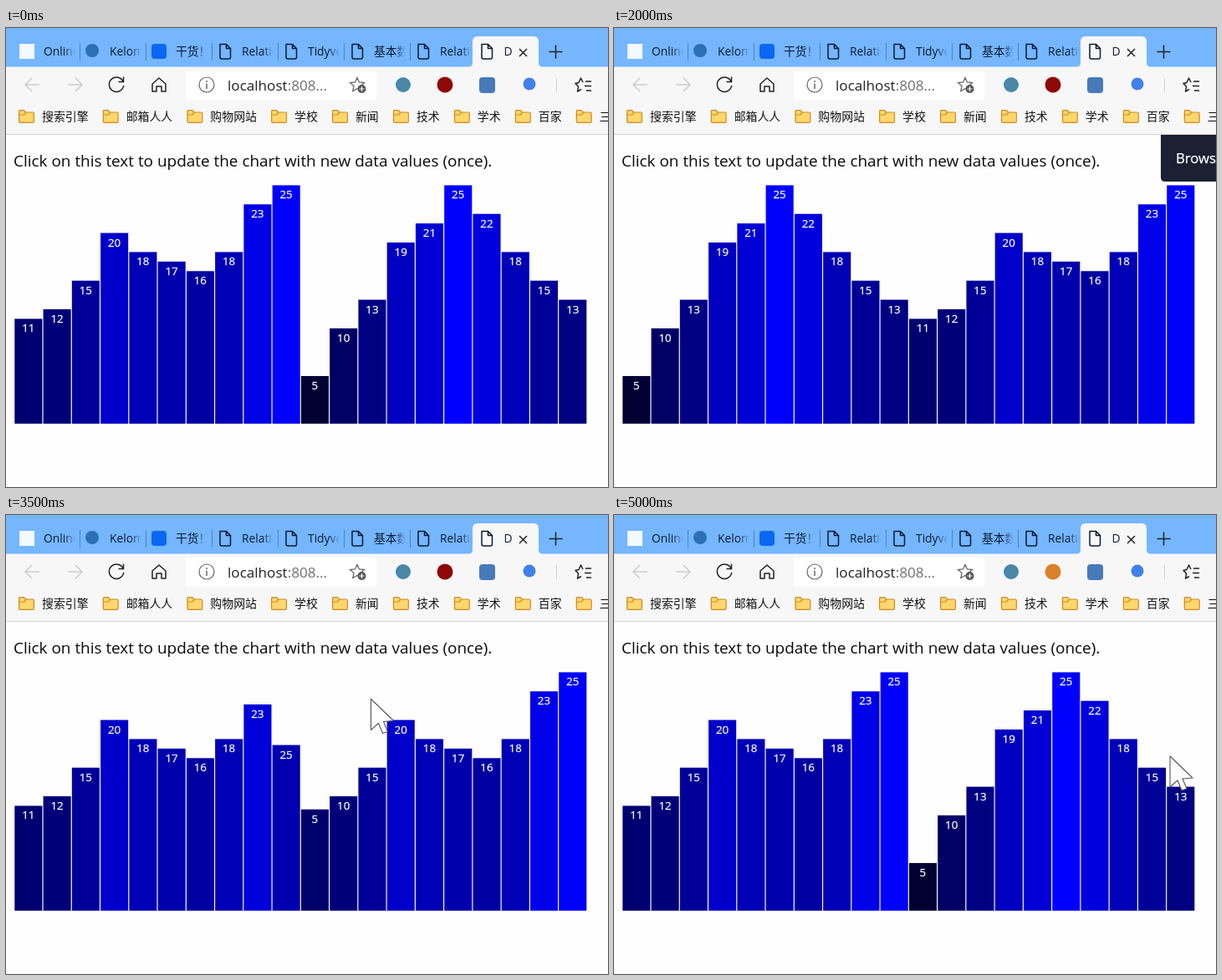
Write an HTML page that moves like this. It is 720 px wide and 550 px high and loops after 5.5 s.

```html
<!DOCTYPE html>
<html lang="en">
<head>
<meta charset="utf-8">
<title>Bar chart in a browser</title>
<style>
  html, body { margin: 0; width: 100%; height: 100%; overflow: hidden; background: #fefefe; }
  svg { display: block; width: 720px; height: 550px; font-family: "Open Sans", "Noto Sans CJK SC", "Noto Sans CJK", sans-serif; }
  .line { fill: none; stroke: #222; stroke-width: 1.5; }
  .dim { stroke: #cdcdcd; }
  .tab { font-size: 13.8px; fill: #0c1a30; }
  .mark { font-size: 13.9px; fill: #111; }
  .label { font-size: 13.3px; fill: #fff; stroke: #fff; stroke-width: .25; text-anchor: middle; }
</style>
</head>
<body>
<svg viewBox="0 0 720 550">
  <defs>
    <linearGradient id="fade" x1="0" x2="1" y1="0" y2="0">
      <stop offset=".65" stop-color="#fff"/>
      <stop offset="1" stop-color="#fff" stop-opacity="0"/>
    </linearGradient>
    <mask id="clip" maskUnits="userSpaceOnUse" x="0" y="0" width="38" height="47">
      <rect width="38" height="47" fill="url(#fade)"/>
    </mask>
    <path id="page" d="M-6-8.5H1.5L6.5-3.5V7Q6.5 9 4.5 9H-4Q-6 9-6 7ZM1.5-8.5V-3.5H6.5" fill="none" stroke="#0c1a30" stroke-width="1.5" stroke-linejoin="round"/>
    <g id="folder" stroke="#cf8a1f" stroke-width="1.2" stroke-linejoin="round">
      <path d="M.6 14V1.6Q.6.6 1.6.6H6.5L8.7 3H17Q18.4 3 18.4 4.4V14Q18.4 15.4 17 15.4H2Q.6 15.4.6 14Z" fill="#ffd76e"/>
      <path d="M.6 6H6.5L9 3.2" fill="none"/>
    </g>
    <path id="star" d="M0-8.5L2.5-3L8.5-2.4L4 1.6L5.2 7.5L0 4.5L-5.2 7.5L-4 1.6L-8.5-2.4L-2.5-3Z"/>
  </defs>

  <rect width="720" height="550" fill="#fefefe"/>
  <rect width="720" height="48" fill="#75b6ff"/>
  <rect y="46.500" width="720" height="81" fill="#f7f7f7"/>
  <rect y="127" width="720" height="1" fill="#d2d2d2"/>
  <path d="M552 47Q558 47 558 41V16Q558 10 564 10H631Q637 10 637 16V41Q637 47 643 47Z" fill="#f7f7f7"/>
  <g id="tabs"></g>

  <rect x="16" y="19" width="18" height="18" fill="#f4f8ff"/>
  <circle cx="103" cy="27" r="8" fill="#2d70b2"/>
  <rect x="174" y="19" width="18" height="18" rx="4" fill="#0c66f2"/>
  <use id="tabPage" href="#page" x="575" y="28"/>
  <g id="loader" fill="#1769d2"><circle cx="569" cy="25" r="1.9"/><circle cx="569" cy="31" r="1.9"/></g>
  <path class="line" d="M614 25L623 34M623 25L614 34M649.500 28.500H665.500M657.500 20.500V36.500"/>

  <path class="line dim" d="M40 68H23M31 60L23 68L31 76M74 68H91M83 60L91 68L83 76"/>
  <rect id="hover" x="110" y="51" width="45" height="35" rx="3" fill="#dcdcdc"/>
  <path id="reload" class="line" d="M140.200 64.500A8.700 8.700 0 1 0 140.700 69M140.500 58.500V64.500H134.500"/>
  <path id="stop" class="line" d="M125.500 61.500L139.500 75.500M139.500 61.500L125.500 75.500"/>
  <path class="line" d="M175 67L183 60L191 67V76H186V70H180V76H175Z" stroke-linejoin="round"/>
  <rect x="215" y="51" width="228" height="35" rx="4" fill="#fff"/>
  <circle class="line" cx="240" cy="68" r="9" style="stroke:#666;stroke-width:1.2"/>
  <path class="line" d="M240 66.500V73M240 63V65" style="stroke:#666"/>
  <text x="265" y="75" font-size="17.1" fill="#222">localhost<tspan fill="#707070">:808...</tspan></text>
  <use href="#star" x="420" y="68" class="line" style="stroke:#666;stroke-width:1.3"/>
  <circle cx="425.500" cy="73" r="5" fill="#555"/>
  <path d="M422.500 73H428.500M425.500 70V76" stroke="#fff" stroke-width="1.2"/>

  <circle cx="475" cy="68" r="9" fill="#4a86a8"/>
  <circle id="blocker" cx="525" cy="68" r="9.500"/>
  <rect x="566" y="59" width="19" height="19" rx="4" fill="#477ab8"/>
  <circle cx="626" cy="67" r="7.500" fill="#4280e8"/>
  <path d="M658.500 60V77" stroke="#d0d0d0"/>
  <path class="line" d="M693 64H700M692 69.500H700M694 75H700M690 65L687.500 60L685 65.500L681 66.500L684.500 70L683.500 76L688 73.500" stroke-linejoin="round"/>
  <g id="marks"></g>

  <text x="9" y="165.500" font-size="18.95" fill="#0a0a0a">Click on this text to update the chart with new data values (once).</text>
  <g id="chart"></g>
  <g id="notice">
    <path d="M654 128H720V184H659Q654 184 654 179Z" fill="#1b2032"/>
    <text x="672" y="162" font-size="16.7" fill="#fff" stroke="#fff" stroke-width=".25">Browsersync: connected</text>
  </g>
  <path id="cursor" d="M0 0V37L9 29L14 41L20 39L15 27L27 26Z" fill="#fff" stroke="#555" stroke-width="1.1" stroke-linejoin="round"/>
</svg>
<script>
const LOOP = 5500, STEP = 500;
const RELOAD = 1500, CLICK = 2375, STAGGER = 100, DURATION = 500;
const before = [5, 10, 13, 19, 21, 25, 22, 18, 15, 13, 11, 12, 15, 20, 18, 17, 16, 18, 23, 25];
const after = [...before.slice(10), ...before.slice(0, 10)];
const LEFT = 10.3, BASE = 474.2, UNIT = 11.43, PITCH = 34.26;
const cursorAt = {
  1000: [138.5, 58.5], 1500: [153, 93], 3000: [436.5, 220.5], 3500: [436.5, 220.5],
  4000: [436.5, 220.5], 4500: [436.5, 220.5], 5000: [665, 289]
};

const $ = id => document.getElementById(id);

function add(parent, name, attrs, text = "") {
  const node = document.createElementNS("http://www.w3.org/2000/svg", name);
  for (const key in attrs) node.setAttribute(key, attrs[key]);
  node.textContent = text;
  return parent.appendChild(node);
}

["Online", "Kelomi", "干货！", "Relatio", "Tidyverse", "基本数据", "Relatio"].forEach((title, i) => {
  const x = 45 + i * 79;
  const tab = add($("tabs"), "g", { transform: `translate(${x})`, mask: "url(#clip)" });
  add(tab, "text", { class: "tab", y: 33 }, title);
  if (i > 2) add($("tabs"), "use", { href: "#page", x: x - 20, y: 28 });
  if (i < 6) add($("tabs"), "path", { d: `M${x + 43.5} 18V39`, stroke: "#4e83bd" });
});
add($("tabs"), "text", { class: "tab", x: 595.5, y: 33 }, "D");

let markX = 15;
for (const name of ["搜索引擎", "邮箱人人", "购物网站", "学校", "新闻", "技术", "学术", "百家", "三"]) {
  add($("marks"), "use", { href: "#folder", x: markX, y: 98 });
  add($("marks"), "text", { class: "mark", x: markX + 28, y: 111 }, name);
  markX += 45.2 + name.length * 13.87;
}

const bars = before.map((_, i) => {
  const x = LEFT + i * PITCH;
  return {
    rect: add($("chart"), "rect", { x, width: 33.1 }),
    label: add($("chart"), "text", { class: "label", x: x + 16.5 })
  };
});

const clamp = v => Math.max(0, Math.min(1, v));
const cubicInOut = u => u < .5 ? 4 * u ** 3 : 1 - 4 * (1 - u) ** 3;
const show = (id, on) => $(id).setAttribute("visibility", on ? "visible" : "hidden");

function drawChart(t) {
  bars.forEach(({ rect, label }, i) => {
    const elapsed = t < RELOAD ? Infinity : t - CLICK - i * STAGGER;
    const value = before[i] + (after[i] - before[i]) * cubicInOut(clamp(elapsed / DURATION));
    const top = BASE - value * UNIT;
    rect.setAttribute("y", top);
    rect.setAttribute("height", BASE - top);
    rect.setAttribute("fill", `rgb(0,0,${Math.round(value * 10.1)})`);
    label.setAttribute("y", top + 16);
    label.textContent = elapsed >= 0 ? after[i] : before[i];
  });
}

function draw(t) {
  const loading = t === RELOAD;
  drawChart(t);
  show("hover", t === 1000 || loading);
  show("reload", !loading);
  show("stop", loading);
  show("tabPage", !loading);
  show("loader", loading);
  show("notice", t >= 2000 && t < 3500);
  $("blocker").setAttribute("fill", loading || t === 5000 ? "#d9822b" : "#8e0808");
  const spot = cursorAt[t];
  show("cursor", spot);
  if (spot) $("cursor").setAttribute("transform", `translate(${spot})`);
}

let shown = -1;
function tick() {
  const t = Math.floor(performance.now() % LOOP / STEP) * STEP;
  if (t !== shown) draw(shown = t);
  requestAnimationFrame(tick);
}
tick();
</script>
</body>
</html>
```
